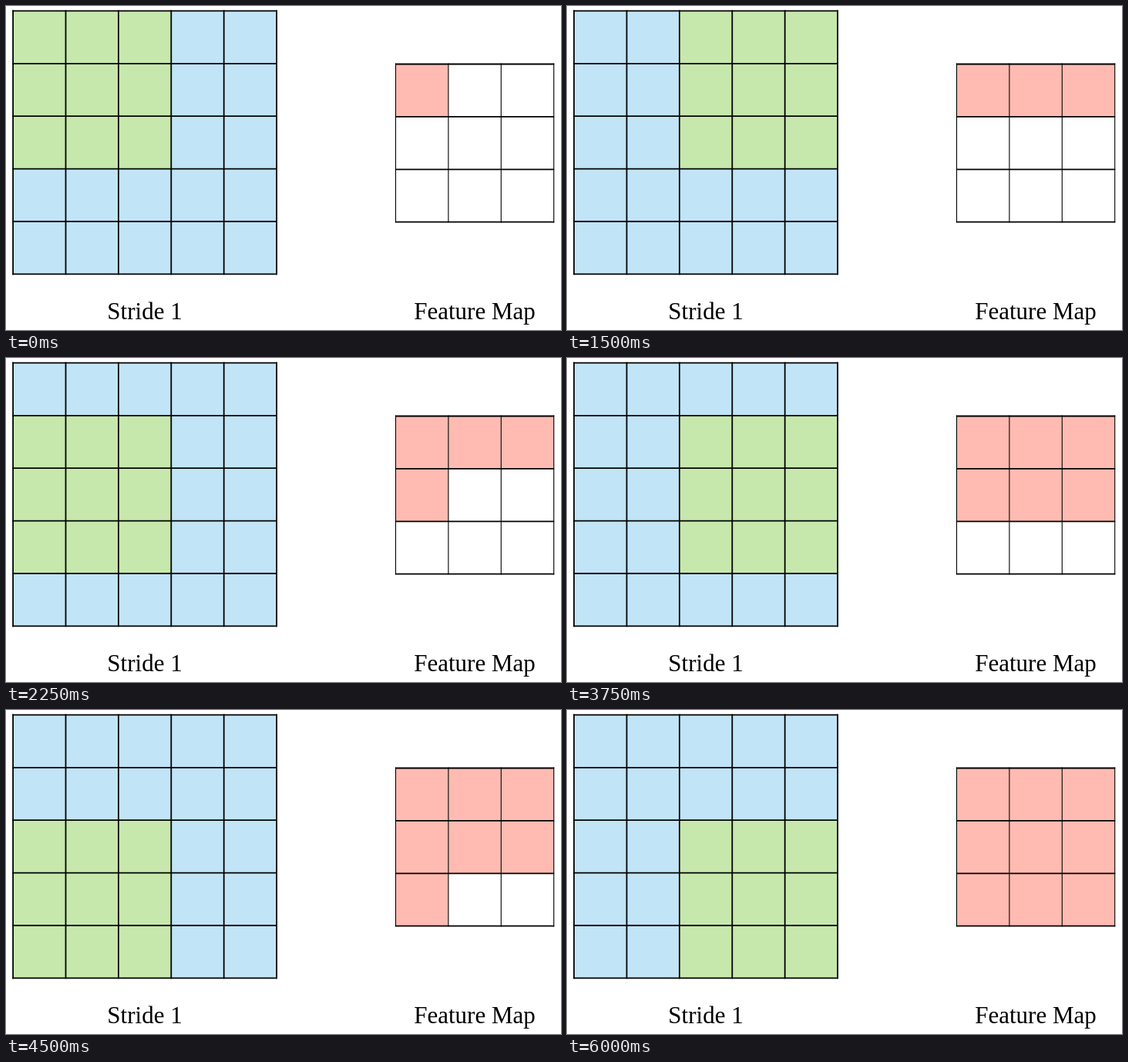
These frames come from a looping animation (720 px wide and 421 px high, 6.75 s). An HTML page:

```html
<!DOCTYPE html>
<html lang="en">
<head>
<meta charset="utf-8">
<title>Stride 1 convolution</title>
<style>
  html, body { margin: 0; width: 100%; height: 100%; overflow: hidden; background: #fff; }
  svg { display: block; width: 720px; height: 421px; }
  text { font: 31px "Liberation Serif", "Times New Roman", serif; text-anchor: middle; }
</style>
</head>
<body>
<svg id="stage" viewBox="0 0 720 421"></svg>
<script>
const CELL = 68.4, STEP = 750, OUT = 3, COUNT = OUT * OUT;
const input = { x: 9.1, y: 6.4, size: 5, across: 1.8, down: 1.8 };
const output = { x: 505.5, y: 75.5, size: OUT, across: 1.8, down: 1.1 };
const stage = document.getElementById('stage');

function add(tag, attrs, text = '') {
  const el = document.createElementNS('http://www.w3.org/2000/svg', tag);
  for (const name in attrs) el.setAttribute(name, attrs[name]);
  el.textContent = text;
  return stage.appendChild(el);
}

function square(x, y, cells, fill) {
  const side = cells * CELL;
  return add('rect', { x, y, width: side, height: side, fill });
}

function gridLines({ x, y, size, across, down }) {
  const side = size * CELL;
  let rows = '', columns = '';
  for (let i = 0; i <= size; i++) {
    rows += `M${x - down / 2} ${y + i * CELL}h${side + down}`;
    columns += `M${x + i * CELL} ${y - across / 2}v${side + across}`;
  }
  add('path', { d: rows, stroke: '#000', 'stroke-width': across });
  add('path', { d: columns, stroke: '#000', 'stroke-width': down });
}

// Holds each step's style until the next one, looping forever.
function play(el, styleAt) {
  const frames = Array.from({ length: COUNT + 1 }, (_, i) => ({
    ...styleAt(Math.min(i, COUNT - 1)), offset: i / COUNT, easing: 'step-end'
  }));
  el.animate(frames, { duration: COUNT * STEP, iterations: Infinity });
}

const column = i => i % OUT * CELL;
const row = i => Math.floor(i / OUT) * CELL;

square(input.x, input.y, input.size, '#c1e4f7');
const kernel = square(input.x, input.y, 3, '#c7e8ac');
play(kernel, i => ({ transform: `translate(${column(i)}px, ${row(i)}px)` }));

for (let n = 0; n < COUNT; n++) {
  const cell = square(output.x + column(n), output.y + row(n), 1, '#ffbbb1');
  play(cell, i => ({ opacity: i >= n ? 1 : 0 }));
}

gridLines(input);
gridLines(output);
add('text', { x: 180, y: 407 }, 'Stride 1');
add('text', { x: 608, y: 407 }, 'Feature Map');
</script>
</body>
</html>
```
